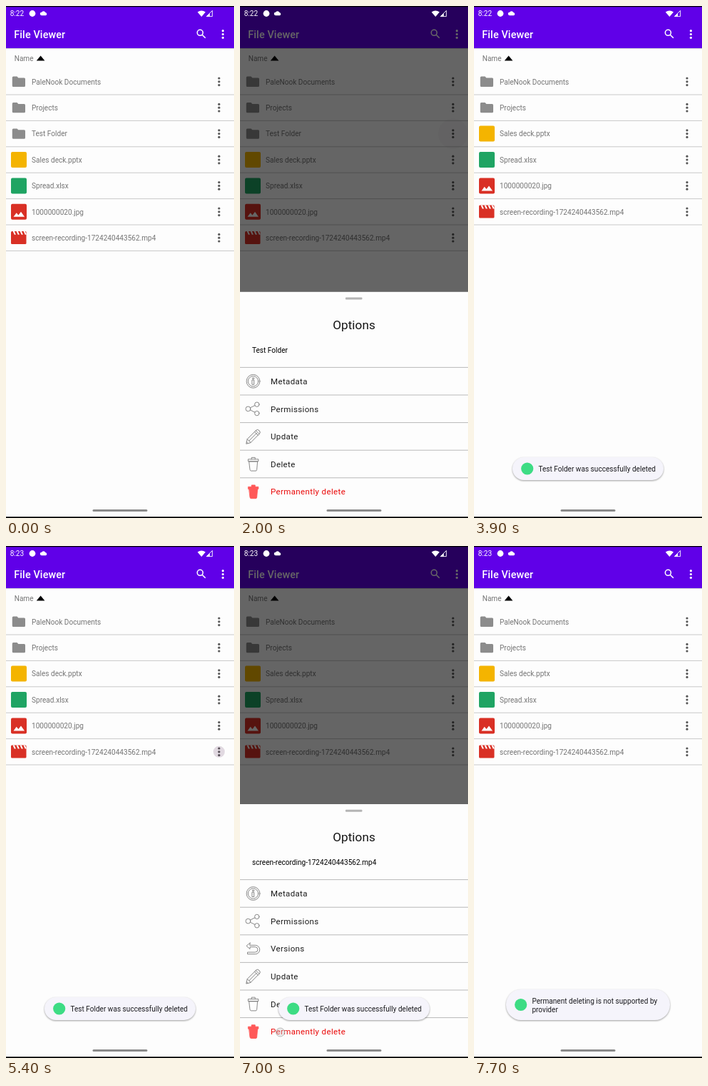
Recreate the animation shown at these times as an HTML page. Size 320 by 716 pixels, loop 8000 ms.

```html
<!DOCTYPE html>
<html lang="en">
<head>
<meta charset="utf-8">
<title>File Viewer</title>
<style>
html, body { margin: 0; width: 100%; height: 100%; overflow: hidden; background: #fdfdfd; }
svg { display: block; width: 320px; height: 716px; font: 10.08px Roboto, sans-serif; }
.title { font-size: 14.4px; font-weight: 500; letter-spacing: .11px; fill: #fff; }
.row { fill: #757575; }
.rule { stroke: #c9c9c9; }
.head { font-size: 17.28px; fill: #151515; }
.item { font-size: 11.52px; letter-spacing: .36px; fill: #1c1c1c; }
.item.red { fill: #ea0b0b; }
.cut { stroke: #b9b9b9; }
.icon { fill: none; stroke: #7b7b7b; stroke-width: .9; stroke-linejoin: round; stroke-linecap: round; }
.icon.red { fill: #ff5959; stroke: #ff5959; }
.toast rect { fill: #f5f4fb; filter: drop-shadow(0 1.2px 1.2px rgba(0,0,0,.38)); }
.toast text { fill: #1b1b1f; }
</style>
</head>
<body>
<svg id="stage" viewBox="0 0 320 716"></svg>
<script>
const LOOP = 8000;
const ROW = 36.4, ITEM = 38.6;
const stage = document.getElementById('stage');

const clamp = x => Math.min(1, Math.max(0, x));
const ramp = (t, from, to) => clamp((t - from) / (to - from));
const text = (x, y, s, cls = '') => `<text x="${x}" y="${y}" class="${cls}">${s}</text>`;
const dots = (x, y, gap, fill) =>
  [-gap, 0, gap].map(d => `<circle cx="${x}" cy="${y + d}" r="1.6" fill="${fill}"/>`).join('');
const tile = fill => `<rect x="7" y="-11" width="22" height="22" rx="2" fill="${fill}"/>`;

// File icons, centred on y = 0
const fileIcons = {
  folder: '<path fill="#8c8c8c" d="M10.3-7.2h5.2l1.8 1.9h8.2q1.5 0 1.5 1.5v9.4q0 1.5-1.5 1.5H10.3q-1.5 0-1.5-1.5V-5.7q0-1.5 1.5-1.5z"/>',
  deck: tile('#f4b400'),
  sheet: tile('#1fa463'),
  image: tile('#d93025') + '<path fill="#fff" d="M10.5 7l4.2-5.6 2.7 3.3L21 0l5 7z"/>',
  video: '<rect x="7" y="-9.3" width="21.5" height="18" rx="1.5" fill="#d93025"/>' +
    [9.5, 14.5, 19.5, 24.5].map(x => `<path fill="#fdfdfd" d="M${x}-9.4h2.2l2.2 5h-2.2z"/>`).join('')
};

const bin = '<path d="M13-3.6h11.6l-1 11.6q-.2 1.5-1.6 1.5h-6.4q-1.4 0-1.6-1.5zM11.8-6.8h14v3h-14zM16.2-6.8v-2.4h5v2.4"/>';
const menuIcons = {
  Metadata: '<circle cx="18.5" cy="0" r="9.4"/><circle cx="18.5" cy="0" r="7.2"/><path d="M17.3-1.8h2.4v6.3h-2.4z"/><circle cx="18.5" cy="-4" r="1.1"/>',
  Permissions: '<circle cx="11.4" cy="0" r="3.4"/><circle cx="23.8" cy="-6.2" r="3.2"/><circle cx="23.8" cy="6.2" r="3.2"/><path d="M14.4-1.6l6.5-3.2M14.4 1.6l6.5 3.2"/>',
  Versions: '<path d="M14-8.2L9-3.9l5 4.2v-2.8h7.2a3.6 3.6 0 0 1 0 7.4H10.5v2.6h11a6 6 0 0 0 0-12.4H14z"/>',
  Update: '<g transform="translate(18.3 .4) rotate(-45)"><path d="M-13.4 0l5.4-3.4H9.5q2.8 0 2.8 3.4t-2.8 3.4H-8zM-8-3.4v6.8M6.5-3.4v6.8M8.8-3.4v6.8M-8 0H6.5M-11.6-1.1v2.2"/></g>',
  Delete: bin,
  'Permanently delete': bin
};

const files = [
  ['folder', 'PaleNook Documents'],
  ['folder', 'Projects'],
  ['folder', 'Test Folder'],
  ['deck', 'Sales deck.pptx'],
  ['sheet', 'Spread.xlsx'],
  ['image', '1000000020.jpg'],
  ['video', 'screen-recording-1724240443562.mp4']
];

const list = (id, rows) => `<g id="${id}">` +
  text(11.7, 77, 'Name', 'row') + '<path d="M42.8 76.6l5.8-7 5.8 7z"/>' +
  rows.map(([kind, name], i) => `<g transform="translate(0 ${105.8 + i * ROW})">
    ${fileIcons[kind]}${text(36, 3.7, name, 'row')}${dots(299, 0, 4.8, '#555')}
    <path class="rule" d="M0 18.2h320"/></g>`).join('') + '</g>';

const sheet = (id, name, items) => `<g id="${id}">
  <rect width="320" height="500" fill="#fdfdfd"/>
  <rect x="148" y="7.8" width="23.5" height="3" rx="1" fill="#b4b4b4"/>
  <text x="160" y="52.4" text-anchor="middle" class="head">Options</text>
  ${text(17, 85, name)}` +
  items.map((label, i) => {
    const red = label.startsWith('Perman') ? 'red' : '';
    return `<g transform="translate(0 ${125 + i * ITEM})"><path class="cut" d="M0-19.4h320"/>
      <g class="icon ${red}">${menuIcons[label]}</g>${text(43, 4.1, label, 'item ' + red)}</g>`;
  }).join('') + '</g>';

const toast = (id, x, y, w, h, lines) => `<g id="${id}" class="toast">
  <rect x="${x}" y="${y}" width="${w}" height="${h}" rx="${Math.min(h / 2, 21)}"/>
  <circle cx="${x + 20.7}" cy="${y + h / 2}" r="8.6" fill="#3ddc84"/>
  ${lines.map((s, i) => text(x + 36.4, y + 20 + i * 11.8, s)).join('')}</g>`;

const shortMenu = ['Metadata', 'Permissions', 'Update', 'Delete', 'Permanently delete'];
const longMenu = ['Metadata', 'Permissions', 'Versions', 'Update', 'Delete', 'Permanently delete'];

stage.innerHTML = `
  <rect width="320" height="716" fill="#fdfdfd"/>
  ${list('before', files)}${list('after', files.filter(f => f[1] !== 'Test Folder'))}
  <circle id="ripple" cx="299" fill="#3a0038"/>
  <path id="spinner" fill="none" stroke="#03dac5" stroke-width="11.6" stroke-linecap="square"/>
  <rect y="59" width="320" height="1" fill="#000" opacity=".16"/>
  <rect width="320" height="59" fill="#6000e8"/>
  ${text(11.3, 44.9, 'File Viewer', 'title')}
  <g fill="none" stroke="#fff" stroke-width="1.6"><circle cx="272.4" cy="37.3" r="4"/><path d="M275.3 40.2l4.6 4.6"/></g>
  ${dots(304.4, 39.5, 4.8, '#fff')}
  <rect id="dim" width="320" height="716"/>
  ${sheet('sheetA', 'Test Folder', shortMenu)}
  ${sheet('sheetB', 'screen-recording-1724240443562.mp4', longMenu)}
  <circle id="touch" cx="56.5" r="6" fill="#ccc" fill-opacity=".35" stroke="#aaa" stroke-width=".8"/>
  <g fill="#fff"><text id="clock" x="5.7" y="14.2"></text>
    <circle cx="37" cy="10.5" r="4.4"/>
    <path d="M50 13.2a2.2 2.2 0 0 1-.1-4.4 3.1 3.1 0 0 1 5.7.5 2 2 0 0 1 .2 3.9z"/>
    <path d="M268.8 8.6q5.6-4.2 11.2 0l-5.6 6.4z"/>
    <path d="M289.6 6.4v8.2h-8.2z" fill="none" stroke="#fff" stroke-width=".9"/><path d="M286 10v4.6h-4.6z"/></g>
  ${toast('toastA', 54, 631, 212, 32, ['Test Folder was successfully deleted'])}
  ${toast('toastB', 45, 620, 230, 43, ['Permanent deleting is not supported by', 'provider'])}
  <rect x="121.5" y="704" width="77" height="3" rx="1.5" fill="#8b8b8b"/>
  <path d="M0 0h320v1.3H0zM0 714.3h320V716H0z"/>`;

const ui = {};
stage.querySelectorAll('[id]').forEach(el => ui[el.id] = el);
const set = (el, attrs) => { for (const k in attrs) el.setAttribute(k, attrs[k]); };
const show = (el, alpha) => set(el, { opacity: alpha, visibility: alpha > 0 ? 'visible' : 'hidden' });

// open: menu tapped; pick: option tapped; done: list is back
const visits = [
  { sheet: ui.sheetA, top: 399.8, menuY: 178.6, open: 1500, pick: 2700, pickY: 641.5, done: 3480 },
  { sheet: ui.sheetB, top: 361, menuY: 287.8, open: 5400, pick: 7000, pickY: 680, done: 7500 }
];

// Standard easing: cubic-bezier(.4, 0, .2, 1)
function ease(x) {
  let lo = 0, hi = 1, s = x;
  for (let i = 0; i < 18; i++) {
    s = (lo + hi) / 2;
    const bx = 1.2 * s * (1 - s) ** 2 + .6 * s * s * (1 - s) + s ** 3;
    if (bx < x) lo = s; else hi = s;
  }
  return s * s * (3 - 2 * s);
}

function arc(ms) {
  const head = 290 * ease(clamp(ms / 666));
  const tail = 290 * ease(clamp((ms - 666) / 666));
  const base = -90 + 286 * ms / 1332;
  const at = deg => {
    const a = deg * Math.PI / 180;
    return `${160 + 54 * Math.cos(a)} ${387 + 54 * Math.sin(a)}`;
  };
  const sweep = Math.max(head - tail, .1);
  return `M${at(base + tail)}A54 54 0 ${sweep > 180 ? 1 : 0} 1 ${at(base + tail + sweep)}`;
}

function draw(t) {
  let dim = 0, touch = 0, ripple = 0, loading = false;

  for (const v of visits) {
    const since = t - v.open, after = t - v.pick;
    const enter = ramp(since, 200, 434), leave = ramp(after, 155, 355);
    const shift = 143 * ((1 - enter) ** 2 + leave);
    set(v.sheet, { transform: `translate(0 ${v.top + shift})` });
    show(v.sheet, clamp(enter * 2) * (1 - leave));
    dim += .6 * ramp(since, 200, 467) * (1 - ramp(after, 155, 340));

    if (since >= 0 && since < 520) {
      ripple = .14 * (1 - ramp(since, 400, 520));
      set(ui.ripple, { cy: v.menuY, r: 8 + 13 * ramp(since, 0, 200) });
    }
    if (after >= 0 && after < 140) {
      touch = 1;
      set(ui.touch, { cy: v.pickY });
    }
    if (after >= 135 && t < v.done) {
      loading = true;
      set(ui.spinner, { d: arc(after - 135) });
    }
  }

  show(ui.dim, dim);
  show(ui.ripple, ripple);
  show(ui.touch, touch);
  show(ui.spinner, +loading);
  show(ui.before, +(!loading && t < 3000));
  show(ui.after, +(!loading && t >= 3000));
  show(ui.toastA, ramp(t, 3460, 3640) * (1 - ramp(t, 7080, 7260)));
  show(ui.toastB, ramp(t, 7480, 7660));
  ui.clock.textContent = t < 5400 ? '8:22' : '8:23';
}

const start = performance.now();
function tick() {
  draw((performance.now() - start) % LOOP);
  requestAnimationFrame(tick);
}
tick();
</script>
</body>
</html>
```
